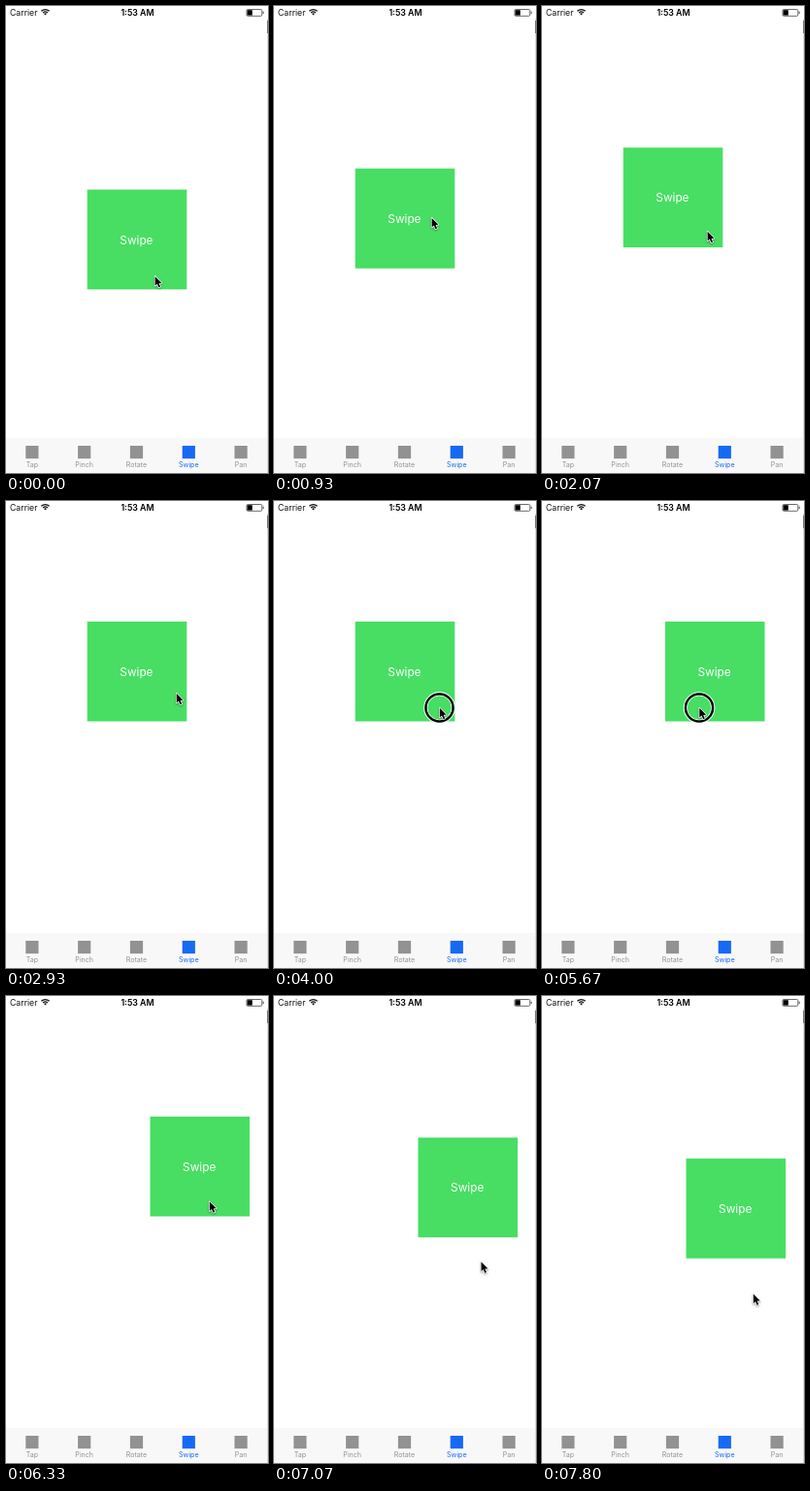
An HTML page with a canvas for the animation above (8 s loop, 270 by 480 pixels).

```html
<!DOCTYPE html>
<html lang="en">
<head>
<meta charset="utf-8">
<title>Swipe gesture</title>
<style>
  html, body { margin: 0; width: 100%; height: 100%; overflow: hidden; background: #fff; }
  canvas { display: block; width: 270px; height: 480px; }
</style>
</head>
<body>
<canvas id="stage"></canvas>
<script>
const W = 270, H = 480, LOOP = 8000, FPS = 15;
const SIZE = 102.6, STEP = 21.6;
const FONT = 'Inter, Roboto, "Liberation Sans", sans-serif';
const GREEN = '#47de63', GREY = '#929292', BLUE = '#1769f4';

const canvas = document.getElementById('stage');
const ctx = canvas.getContext('2d');
const dpr = window.devicePixelRatio || 1;
canvas.width = W * dpr;
canvas.height = H * dpr;

// Box direction and the slightly slanted path of the hand
const UP = { dx: 0, dy: -1, handX: 0.15, handY: -1 };
const RIGHT = { dx: 1, dy: 0, handX: 1, handY: -0.03 };
const DOWN = { dx: 0, dy: 1, handX: 0.06, handY: 1 };

// A swipe: button down and up (ticks of 1/15 s), where it begins, how far it goes
const swipe = (dir, down, up, x, y, reach) => ({
  dir, down, up, x, y,
  drag: down + (up - down) / 3,
  endX: x + dir.handX * reach,
  endY: y + dir.handY * reach
});

const swipes = [
  swipe(UP, 7, 14, 153.3, 277.6, 60),
  swipe(UP, 22, 25, 168, 243, 52),
  swipe(UP, 34, 44, 170.3, 231.5, 34),
  swipe(RIGHT, 54, 63, 136, 213.5, 69),
  swipe(RIGHT, 70.5, 73.8, 151, 208.5, 70),
  swipe(RIGHT, 84, 88, 162, 212.5, 47.5),
  swipe(DOWN, 99, 104, 209.5, 211, 62),
  swipe(DOWN, 112, 117, 213.6, 241, 65)
];

// Smooth progress from 0 to 1 between two ticks
function ease(tick, from, to) {
  const u = Math.min(1, Math.max(0, (tick - from) / (to - from)));
  return u * u * (3 - 2 * u);
}

const mix = (a, b, u) => a + (b - a) * u;

// Drag along each swipe, rest briefly, then go to where the next one begins
function pointerAt(tick) {
  let { x, y } = swipes[0];
  swipes.forEach((s, i) => {
    if (tick < s.drag) return;
    const next = swipes[i + 1];
    const out = ease(tick, s.drag, s.up);
    const back = next ? ease(tick, s.up + 2, s.up + 5.5) : 0;
    x = mix(mix(s.x, s.endX, out), next ? next.x : 0, back);
    y = mix(mix(s.y, s.endY, out), next ? next.y : 0, back);
  });
  return { x, y };
}

// The box jumps one step when a swipe is recognised, just before release
function boxAt(tick) {
  let x = (W - SIZE) / 2, y = (H - SIZE) / 2;
  for (const { dir, up } of swipes) {
    if (tick >= up - 2) { x += dir.dx * STEP; y += dir.dy * STEP; }
  }
  return { x, y };
}

function rect(x, y, w, h, color) {
  ctx.fillStyle = color;
  ctx.fillRect(x, y, w, h);
}

function text(str, x, y, size, color, weight = 400, align = 'center') {
  ctx.font = `${weight} ${size}px ${FONT}`;
  ctx.textAlign = align;
  ctx.fillStyle = color;
  ctx.fillText(str, x, y);
}

function arc(x, y, r, width, color, from = 0, to = Math.PI * 2) {
  ctx.beginPath();
  ctx.arc(x, y, r, from, to);
  ctx.lineWidth = width;
  ctx.strokeStyle = color;
  ctx.stroke();
}

function drawStatus() {
  text('Carrier', 4, 10, 8.7, '#111', 400, 'left');
  text('1:53 AM', 135.5, 10, 8.8, '#000', 600);

  // Wi-Fi
  for (let i = 0; i < 3; i++) {
    arc(40.5, 9.4, 1 + i * 2.4, i ? 1.2 : 2, '#111', -Math.PI * 0.75, -Math.PI * 0.25);
  }

  // Battery
  ctx.lineWidth = 0.8;
  ctx.strokeStyle = '#444';
  ctx.beginPath();
  ctx.roundRect(248, 3.5, 15.8, 6.8, 1.2);
  ctx.stroke();
  rect(248.6, 4.2, 5.2, 5.4, '#000');
  rect(264.6, 5.7, 1, 2.4, '#444');
}

function drawTabs() {
  rect(0, 444, W, H - 444, '#f8f8f8');
  ['Tap', 'Pinch', 'Rotate', 'Swipe', 'Pan'].forEach((name, i) => {
    const x = 26.9 + i * 53.8;
    const color = name === 'Swipe' ? BLUE : GREY;
    rect(x - 6.6, 452, 13.2, 13.2, color);
    text(name, x, 473.8, 7.1, color);
  });
}

// Sliver of the window frame on the right
function drawEdge() {
  rect(269, 13, 1, H - 13, '#dcdcdc');
  rect(269, 15, 1, 13, '#777');
}

function drawBox({ x, y }) {
  rect(x, y, SIZE, SIZE, GREEN);
  text('Swipe', x + SIZE / 2 - 0.6, y + SIZE / 2 + 4.5, 11.8, '#fff');
}

function drawRing({ x, y }, fading) {
  const halo = fading ? 'rgba(225,255,170,0.65)' : 'rgba(255,255,255,0.9)';
  arc(x, y, 15.7, 1.3, halo);
  arc(x, y, 12.6, 1, halo);
  if (!fading) arc(x, y, 14.1, 2.3, '#000');
}

const ARROW = new Path2D('M.3 .3V10L2.5 8 4.1 11.7 5.8 11 4.2 7.4 7.2 7.2Z');

function drawPointer({ x, y }) {
  ctx.save();
  ctx.translate(x, y);
  ctx.lineJoin = 'round';
  ctx.shadowColor = 'rgba(0,0,0,0.4)';
  ctx.shadowBlur = 2 * dpr;
  ctx.shadowOffsetY = dpr;
  ctx.lineWidth = 1.5;
  ctx.strokeStyle = '#fff';
  ctx.stroke(ARROW);
  ctx.shadowColor = 'transparent';
  ctx.fillStyle = '#000';
  ctx.fill(ARROW);
  ctx.restore();
}

function draw(ms) {
  const tick = Math.floor((ms % LOOP) * FPS / 1000 + 0.06);
  const pointer = pointerAt(tick);
  const held = swipes.find(s => tick >= s.down && tick < s.up);

  ctx.setTransform(dpr, 0, 0, dpr, 0, 0);
  rect(0, 0, W, H, '#fff');
  drawStatus();
  drawTabs();
  drawEdge();
  drawBox(boxAt(tick));
  if (held) drawRing(pointer, tick >= held.up - 1);
  drawPointer(pointer);
}

const begin = performance.now();
function loop() {
  draw(performance.now() - begin);
  requestAnimationFrame(loop);
}
loop();
</script>
</body>
</html>
```
